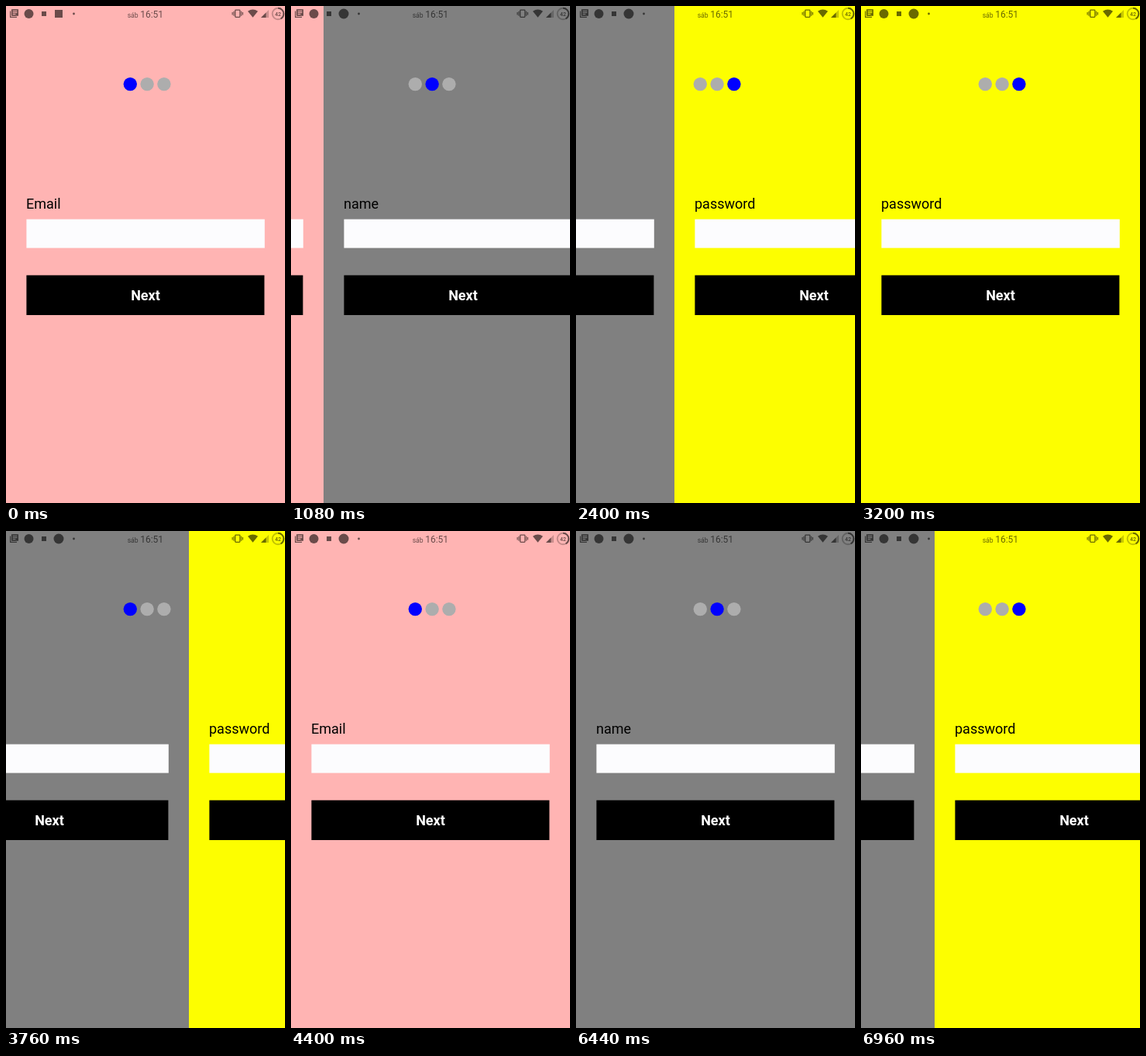
Recreate the animation shown at these times as an HTML page. Size 360 px wide and 640 px high, loop 7 s.

```html
<!DOCTYPE html>
<html lang="en">
<head>
<meta charset="utf-8">
<title>Sign-up pager</title>
<style>
  html, body { margin: 0; width: 100%; height: 100%; overflow: hidden; background: #ffb4b3; }
  svg { display: block; width: 100%; height: 100%; font-family: Roboto, Arial, sans-serif; }
  .label { font-size: 18px; }
  .next { font-size: 18px; font-weight: 700; fill: #fff; text-anchor: middle; }
  .line { fill: none; stroke: #000; }
</style>
</head>
<body>
<svg viewBox="0 0 360 640">
  <g id="track"></g>
  <g id="dots"></g>
  <g id="status" opacity=".58">
    <path class="line" stroke-width="1.2" d="M5.6 6.5V14.4H14"/>
    <path fill-rule="evenodd" d="M7 4.2h9v8.6H7zM8.6 5.9v1h5.8v-1zM8.6 8v1h5.8V8zM8.6 10.1v1h3.8v-1z"/>
    <circle cx="29.5" cy="10" r="6"/>
    <rect x="46" y="7" width="6" height="6"/>
    <rect id="oldIcon" x="63" y="5" width="10" height="10"/>
    <circle id="newIcon" cx="68" cy="10" r="6.5"/>
    <circle cx="87.5" cy="10" r="1.4"/>
    <text x="156.7" y="15" font-size="8.6">sáb</text>
    <text x="173.2" y="15" font-size="12">16:51</text>
    <rect class="line" x="295.7" y="5.2" width="6.2" height="9.2" rx=".8" stroke-width="1.3"/>
    <path class="line" stroke-width="1.1" d="M293.9 6.8v6M292.1 8v3.6M303.7 6.8v6M305.5 8v3.6"/>
    <path d="M312 6.8Q318.5 2 325 6.8L318.5 14.8Z"/>
    <path opacity=".35" d="M329 15L339 5V15Z"/>
    <path d="M329 15L335.5 8.5V15Z"/>
    <circle class="line" cx="351" cy="10" r="7.3" stroke-width="2" opacity=".4"/>
    <circle class="line" cx="351" cy="10" r="7.3" stroke-width="2" pathLength="100"
            stroke-dasharray="42 58" transform="rotate(-90 351 10)"/>
    <text x="351" y="12.6" font-size="7" font-weight="500" text-anchor="middle">42</text>
  </g>
</svg>
<script>
const LOOP = 7000;
const WIDTH = 360;
const SLIDE_MS = 880;
const pages = [
  { label: 'Email', color: '#ffb4b3' },
  { label: 'name', color: '#808080' },
  { label: 'password', color: '#fdfe00' }
];
// start time, page left, page entered
const slides = [
  [543, 0, 1],
  [2034, 1, 2],
  [3510, 2, 0],
  [5117, 0, 1],
  [6547, 1, 2]
];

const byId = id => document.getElementById(id);
const track = byId('track');

track.innerHTML = pages.map(({ label, color }, i) => `
  <g transform="translate(${i * WIDTH})">
    <rect width="${WIDTH + 1}" height="640" fill="${color}"/>
    <text class="label" x="26" y="261">${label}</text>
    <rect x="26.4" y="274.6" width="307.4" height="37" fill="#fcfcfe"/>
    <rect x="26.4" y="346.7" width="307" height="51.3"/>
    <text class="next" x="180" y="379">Next</text>
  </g>`).join('');

byId('dots').innerHTML = pages.map((_, i) =>
  `<circle cx="${160.3 + i * 21.8}" cy="100.6" r="8.7"/>`).join('');
const dots = [...byId('dots').children];

const clamp = v => Math.min(1, Math.max(0, v));

// cubic-bezier(.4, 0, .2, 1)
function ease(x) {
  let low = 0, high = 1;
  for (let i = 0; i < 24; i++) {
    const s = (low + high) / 2, r = 1 - s;
    if (1.2 * r * r * s + 0.6 * r * s * s + s ** 3 < x) low = s;
    else high = s;
  }
  return low * low * (3 - 2 * low);
}

function scaleIcon(icon, k) {
  icon.setAttribute('transform', `translate(68 10) scale(${k}) translate(-68 -10)`);
}

function render(t) {
  const [start, from, to] = slides.filter(s => s[0] <= t).pop() || [0, 0, 0];
  const page = from + (to - from) * ease(clamp((t - start) / SLIDE_MS));
  track.setAttribute('transform', `translate(${-Math.round(page * WIDTH)})`);
  dots.forEach((dot, i) => dot.setAttribute('fill', i === to ? '#00f' : '#adadad'));
  scaleIcon(byId('oldIcon'), 1 - clamp((t - 20) / 160));
  scaleIcon(byId('newIcon'), clamp((t - 180) / 200));
}

const begin = performance.now();
function tick() {
  render((performance.now() - begin) % LOOP);
  requestAnimationFrame(tick);
}
render(0);
requestAnimationFrame(tick);
</script>
</body>
</html>
```
